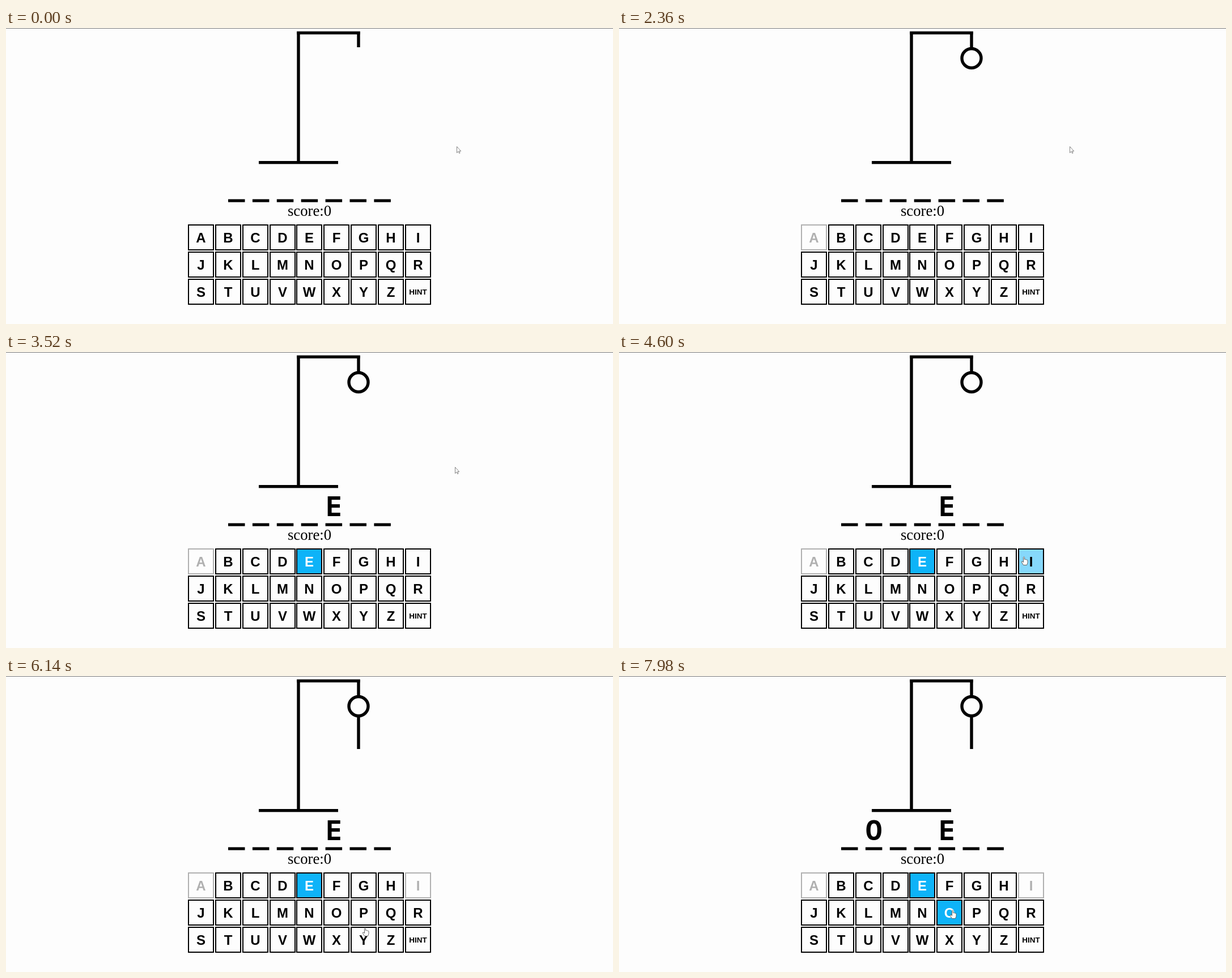
Animation of 1071x523 px, one loop 8000 ms. Source, as an HTML page with a canvas:

```html
<!DOCTYPE html>
<html lang="en">
<head>
<meta charset="utf-8">
<title>Word guessing game</title>
<style>
html, body { margin: 0; width: 100%; height: 100%; overflow: hidden; background: #fdfdfd; }
canvas { display: block; }
</style>
</head>
<body>
<canvas id="stage" width="1071" height="523"></canvas>
<script>
const ctx = document.getElementById('stage').getContext('2d');
const LOOP = 8000;
const KEYS = [...'ABCDEFGHIJKLMNOPQRSTUVWXYZ', 'HINT'];
const SIZE = 46;
const BLUE = '#0eb3f8', HOVER = '#86d8fb', FADED = '#b0b0b0';

// Time at which each letter is chosen; slot is its place in the word
const guesses = {
  A: { at: 2000 },
  E: { at: 2900, slot: 4 },
  I: { at: 5300 },
  O: { at: 7000, slot: 1 }
};

// Pointer tip: time, x, y
const path = [
  [3400, 795, 209], [3520, 792, 203], [4080, 741, 264], [4450, 713, 361],
  [5700, 713, 361], [6140, 632, 444], [6650, 587, 413]
];

function pointerAt(t) {
  const i = path.findIndex(p => p[0] > t);
  if (i === 0) return path[0].slice(1);
  if (i < 0) return path[path.length - 1].slice(1);
  const [t0, x0, y0] = path[i - 1], [t1, x1, y1] = path[i];
  const u = (t - t0) / (t1 - t0), k = u * u * (3 - 2 * u);
  return [x0 + (x1 - x0) * k, y0 + (y1 - y0) * k];
}

function bar(x, y, w, h) {
  ctx.fillStyle = '#000';
  ctx.fillRect(x, y, w, h);
}

function text(str, x, y, font, color = '#000') {
  ctx.font = font;
  ctx.fillStyle = color;
  ctx.fillText(str, x, y);
}

function drawGallows(misses) {
  bar(446, 235, 140, 5.3);
  bar(513.3, 6, 5.4, 230);
  bar(513.3, 6, 111.4, 5.3);
  bar(619.3, 6, 5.4, 28);
  if (misses > 0) {
    ctx.strokeStyle = '#000';
    ctx.lineWidth = 5.4;
    ctx.beginPath();
    ctx.arc(622, 53.5, 17, 0, Math.PI * 2);
    ctx.stroke();
  }
  if (misses > 1) bar(619.3, 71, 5.4, 58);
}

function drawKey(label, i, t, [px, py]) {
  const x = Math.round(321 + (i % 9) * 47.87);
  const y = Math.round(347 + Math.floor(i / 9) * 47.9);
  const guess = guesses[label];
  const used = guess && t >= guess.at;
  const hit = used && guess.slot !== undefined;
  const faded = used && !hit;
  const over = px > x + 2 && px < x + SIZE - 2 && py > y + 2 && py < y + SIZE - 2;

  if (hit || (over && !used)) {
    ctx.fillStyle = hit ? BLUE : HOVER;
    ctx.fillRect(x, y, SIZE, SIZE);
  }
  ctx.strokeStyle = faded ? FADED : '#000';
  ctx.lineWidth = 2;
  ctx.strokeRect(x + 1, y + 1, SIZE - 2, SIZE - 2);

  const small = label.length > 1;
  text(label, x + SIZE / 2, y + (small ? 27.5 : 31.5),
    `bold ${small ? 13.5 : 24}px "Liberation Sans", Arial, sans-serif`,
    hit ? '#fff' : faded ? FADED : '#000');
}

const arrow = new Path2D('M0 0V11L2.6 8.6L4.2 12L5.6 11.3L4.2 8H7.2Z');
const hand = new Path2D('M0 1Q1 -1 2 1V5Q3.5 4 4 5.5Q5.5 4.5 6 6Q7.5 5.5 7.5 7V11L6 15H0L-3 10Q-3.5 8 -1.5 8.5L0 10Z');

function drawPointer([x, y]) {
  const onKeys = x > 321 && x < 750 && y > 347 && y < 489;
  const shape = onKeys ? hand : arrow;
  ctx.save();
  ctx.translate(x + .5, y + .5);
  ctx.fillStyle = '#fff';
  ctx.fill(shape);
  ctx.strokeStyle = onKeys ? '#555' : '#777';
  ctx.lineWidth = .9;
  ctx.stroke(shape);
  ctx.restore();
}

function draw(t) {
  const pointer = pointerAt(t);
  const made = Object.entries(guesses).filter(([, g]) => t >= g.at);

  ctx.fillStyle = '#fdfdfd';
  ctx.fillRect(0, 0, 1071, 523);
  ctx.fillStyle = '#777';
  ctx.fillRect(0, 0, 1071, 1);
  ctx.textAlign = 'center';

  drawGallows(made.filter(([, g]) => g.slot === undefined).length);
  for (let i = 0; i < 7; i++) bar(392 + i * 42.9, 302.5, 29.5, 5.2);
  for (const [letter, { slot }] of made) {
    if (slot !== undefined) {
      text(letter, 406.8 + slot * 42.9, 290, 'bold 49px "Noto Sans Mono", monospace');
    }
  }
  text('score:0', 535.5, 332, '26.7px "Liberation Serif", "Times New Roman", serif');
  KEYS.forEach((label, i) => drawKey(label, i, t, pointer));
  drawPointer(pointer);
}

const start = performance.now();
function tick() {
  draw((performance.now() - start) % LOOP);
  requestAnimationFrame(tick);
}
tick();
</script>
</body>
</html>
```
